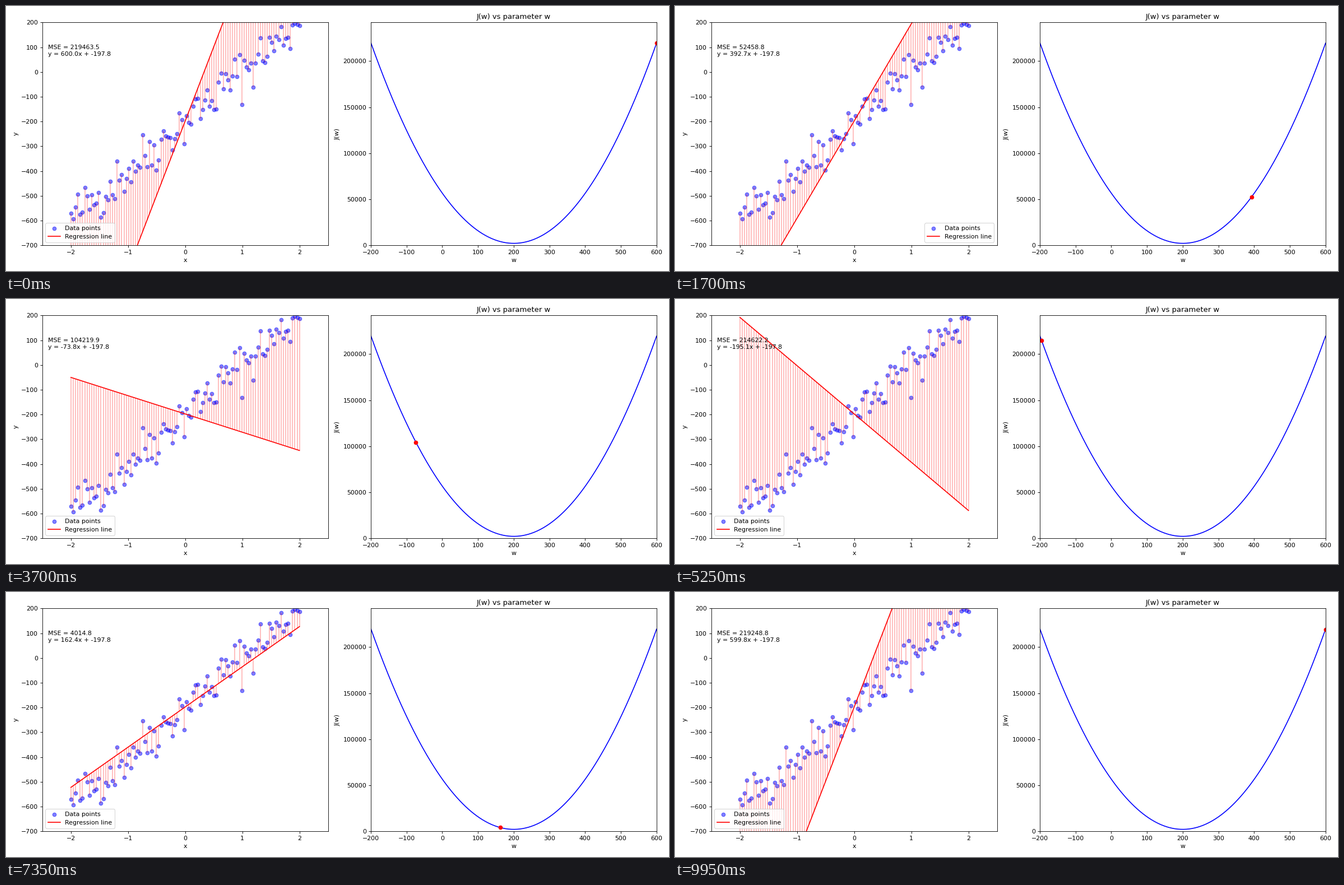
Write a matplotlib script that moves like this. It is 1183 px wide and 473 px high and loops after 10 s.

```python
import matplotlib.pyplot as plt
import numpy as np
from matplotlib.animation import FuncAnimation

W, H, DPI = 1183, 473, 78.87
FRAMES, INTERVAL = 200, 50
SLOPE, BIAS, NOISE = 198.5, -197.8, 50

np.random.seed(42)
x = np.linspace(-2, 2, 100)
y = SLOPE * x + BIAS + NOISE * np.random.randn(x.size)


def predict(w):
    return w * x + BIAS


def cost(w):
    return np.mean((y - predict(w)) ** 2)


def weight(i):
    return 200 + 400 * np.cos(2 * np.pi * i / FRAMES)


def residuals(w):
    return np.stack([np.column_stack([x, y]),
                     np.column_stack([x, predict(w)])], axis=1)


# The small margin keeps the pixel size from rounding down.
fig, (ax, ax_cost) = plt.subplots(
    1, 2, figsize=((W + 0.01) / DPI, (H + 0.01) / DPI), dpi=DPI)

ax.set(xlim=(-2.5, 2.5), ylim=(-700, 200), xlabel="x", ylabel="y")
ax.scatter(x, y, color="blue", alpha=0.5, label="Data points")
sticks = ax.vlines(x, y, predict(weight(0)), color="red", alpha=0.3)
line, = ax.plot(x, predict(weight(0)), color="red", label="Regression line")
info = ax.text(0.02, 0.9, "", transform=ax.transAxes, va="top")
legend = ax.legend(loc="lower left")

ws = np.linspace(-200, 600, 200)
costs = [cost(w) for w in ws]
ax_cost.set(xlim=(-200, 600), ylim=(0, 1.1 * max(costs)),
            xlabel="w", ylabel="J(w)", title="J(w) vs parameter w")
ax_cost.plot(ws, costs, color="blue")
dot, = ax_cost.plot([], [], "ro")

# Measure the text for the layout at a finer resolution.
fig.set_dpi(100)
fig.tight_layout()
fig.set_dpi(DPI)


def update(i):
    w = weight(i)
    mse = cost(w)
    line.set_ydata(predict(w))
    sticks.set_segments(residuals(w))
    dot.set_data([w], [mse])
    info.set_text(f"MSE = {mse:.1f}\ny = {w:.1f}x + {BIAS:.1f}")
    # The legend steps aside while the line runs through its corner.
    legend.set_loc("lower right" if 204 < w < 395 else "lower left")
    return line, sticks, dot, info, legend


anim = FuncAnimation(fig, update, frames=FRAMES, interval=INTERVAL,
                     repeat=True, repeat_delay=0)
plt.show()
```
